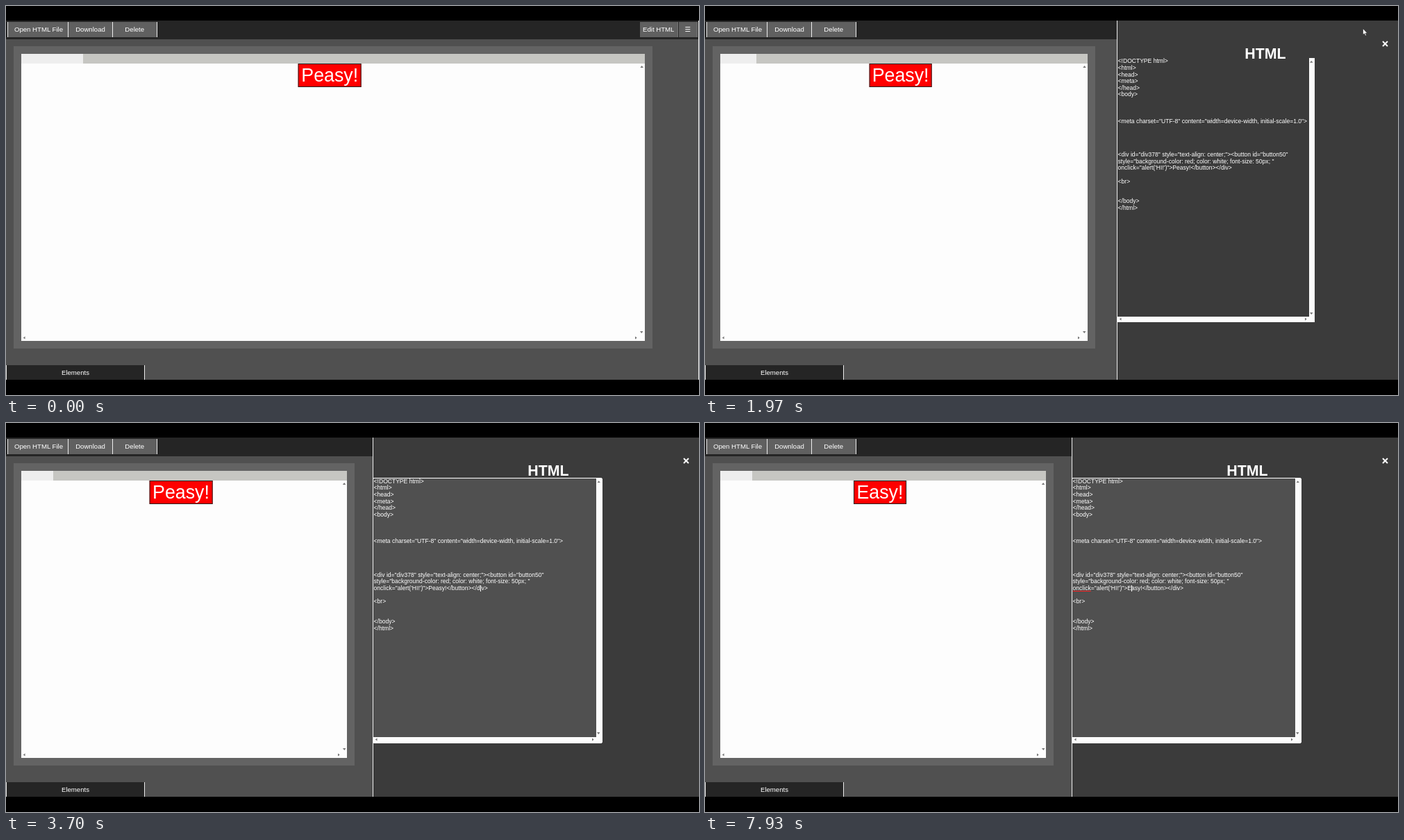
Animation, 998 px wide and 561 px high, one loop 8000 ms. Source, as an HTML page:

```html
<!DOCTYPE html>
<html lang="en">
<head>
<meta charset="utf-8">
<title>HTML editor</title>
<style>
html, body { margin: 0; width: 100%; height: 100%; overflow: hidden; background: #000; }
#stage { position: relative; width: 998px; height: 561px; overflow: hidden;
  font: 9.62px/22px "Liberation Sans", Arial, sans-serif; color: #fff; }
#stage div, #stage svg { position: absolute; box-sizing: border-box; }
#page { left: 0; top: 21px; width: 998px; height: 518px; background: #505050; overflow: hidden; }
#header { left: 0; top: 0; width: 998px; height: 26.5px; background: #252525; }
.btn { top: 2px; height: 22px; background: #606060; text-align: center; border-right: 1px solid #eee; white-space: nowrap; }
.plain { border-color: #777; }
#elements { left: 0; top: 496.5px; width: 200px; height: 21.5px; background: #252525;
  border: solid #eee; border-width: 0 1px; text-align: center; }
#frame { left: 11px; top: 37px; height: 436px; background: #636363; }
#view { left: 10.5px; right: 11px; top: 11px; height: 414px; background: #fdfdfd; }
#strip { left: 0; top: 0; width: 100%; height: 13.5px; background: #c6c6c2; }
#tab { left: 0; top: 0; width: 10%; height: 100%; background: #eee; }
#doc { left: 0; right: 9px; top: 13.5px; height: 34.5px; }
#demo { left: 50%; top: 0; height: 34.5px; padding: 0 3.5px; transform: translateX(-50%);
  background: #f00; border: 1.2px solid #222; font-size: 26.74px; line-height: 33px; white-space: nowrap; }
#panel { top: 0; right: 0; height: 518px; background: #3b3b3b; border-left: 1px solid #eee; overflow: hidden; }
#title { top: 36px; transform: translateX(-50%); font-weight: bold; font-size: 21.39px; line-height: 24px; }
#close { right: 14.5px; top: 29px; }
#editor { left: 0; height: 381px; }
#code { inset: 0 8px 8px 0; padding: 0 .3px 0 .6px; overflow: hidden; font-size: 8.555px; line-height: 9.62px;
  white-space: pre-wrap; overflow-wrap: break-word; }
#code .bad { text-decoration: underline 1px #f22; text-underline-offset: 1px; text-decoration-skip-ink: none; }
#vbar { right: 0; top: 0; width: 8px; height: 100%; background: #fcfcfc; }
#hbar { left: 0; bottom: 0; width: 100%; height: 8px; background: #fcfcfc; }
#ring { inset: -1px; border: 1px solid #fff; border-radius: 2px; }
#caret { top: 154.4px; width: 1px; height: 9px; background: #fff; }
#stage .tri { width: 4.6px; height: 3px; background: #777; clip-path: polygon(50% 0, 100% 100%, 0 100%); }
.up { right: 2px; top: 3.5px; }
.down { right: 2px; bottom: 11.5px; transform: rotate(180deg); }
.left { left: 2.4px; bottom: 3px; transform: rotate(-90deg); }
.right { right: 10.2px; bottom: 3px; transform: rotate(90deg); }
#view .up { top: 17px; }
</style>
</head>
<body>
<div id="stage">
  <div id="page">
    <div id="header">
      <div class="btn" style="left:2px;width:88px;border-left:1px solid #eee;padding-left:2px">Open HTML File</div>
      <div class="btn" style="left:90px;width:64px">Download</div>
      <div class="btn" style="left:154px;width:63.5px">Delete</div>
      <div class="btn plain" style="left:913px;width:54.5px">Edit HTML</div>
      <div class="btn plain" style="left:968.5px;width:27.5px">☰</div>
    </div>
    <div id="frame"><div id="view" class="scroll">
      <div id="strip"><div id="tab"></div></div>
      <div id="doc"><div id="demo"></div></div>
    </div></div>
    <div id="elements">Elements</div>
    <div id="panel">
      <div id="editor" class="scroll">
        <div id="vbar"></div><div id="hbar"></div>
        <div id="code"></div>
        <div id="caret"></div>
        <div id="ring"></div>
      </div>
      <div id="title">HTML</div>
      <svg id="close" width="9" height="9"><path d="M1 1 8 8M8 1 1 8" stroke="#fff" stroke-width="2"/></svg>
    </div>
  </div>
  <svg id="mouse" width="9" height="13"><path d="M.5 .5V9.6L2.6 7.7 4 11 5.5 10.3 4.1 7.2H6.8Z" fill="#fff" stroke="#222" stroke-width=".6"/></svg>
</div>
<script>
const LOOP = 8000, OPEN = 1660, OPEN_TIME = 548, PANEL = 470;
const HOVER = 2500, FOCUS = 3700, SPELL = 4030, CLICK = 6530;
// Edits to the button label: time, label, caret x in the editor
const edits = [[0, 'Peasy!', 153.5], [CLICK, 'Peasy!', 89.5], [6900, 'Pasy!', 84.5], [7130, 'asy!', 79], [7400, 'Easy!', 84.5]];

const $ = id => document.getElementById(id);
const clamp = v => Math.min(1, Math.max(0, v));
const mix = (a, b, k) => a + (b - a) * k;
const smooth = k => k * k * (3 - 2 * k);

for (const box of document.querySelectorAll('.scroll'))
  for (const side of ['up', 'down', 'left', 'right'])
    box.insertAdjacentHTML('beforeend', `<div class="tri ${side}"></div>`);

// CSS "ease", cubic-bezier(.25, .1, .25, 1)
function ease(x) {
  let lo = 0, hi = 1;
  for (let i = 0; i < 24; i++) {
    const s = (lo + hi) / 2;
    if (.75 * s * (1 - s) + s ** 3 < x) lo = s; else hi = s;
  }
  return .3 * lo * (1 - lo) ** 2 + 3 * (1 - lo) * lo * lo + lo ** 3;
}

const escape = s => s.replace(/</g, '&lt;');
const word = (s, bad) => bad ? `<span class="bad">${s}</span>` : s;
function source(label, t) {
  const spell = t >= SPELL;
  return escape('<!DOCTYPE html>\n<html>\n<head>\n<meta>\n</head>\n<body>\n\n\n\n' +
    '<meta charset="UTF-8" content="width=device-width, initial-scale=1.0">\n\n\n\n\n' +
    '<div id="div378" style="text-align: center;"><button id="button50" ' +
    'style="background-color: red; color: white; font-size: 50px; " ') +
    word('onclick', spell) + `="alert('HI!')">` +
    word(label.slice(0, -1), spell && t < CLICK) + '!' +
    escape('</button></div>\n\n<br>\n\n\n</body>\n</html>');
}

let shown = '';
function draw(t) {
  const w = Math.max(1, PANEL * ease(clamp((t - OPEN) / OPEN_TIME)));
  $('frame').style.width = .9137 * (998 - w) + 9 + 'px';
  $('panel').style.width = w + 'px';
  $('title').style.left = .6 * w - 30 + 'px';
  const editor = $('editor').style;
  editor.width = .7 * w + 'px';
  editor.top = 26.6 + .0685 * w + 'px';
  editor.background = `rgba(80,80,80,${clamp((t - HOVER) / 150)})`;

  const [start, label, x] = edits.findLast(e => t >= e[0]);
  const html = source(label, t);
  if (html !== shown) $('code').innerHTML = shown = html;
  $('demo').textContent = label;

  const focused = t >= FOCUS;
  const blinkOn = Math.floor((t - Math.max(start, FOCUS)) / 510) % 2 === 0;
  $('ring').hidden = !focused;
  $('caret').style.left = x + 'px';
  $('caret').hidden = !focused || !(blinkOn || t >= 7900);

  const move = smooth(clamp((t - 2240) / 300));
  const mouse = $('mouse').style;
  mouse.display = t >= 985 && t < 2530 ? '' : 'none';
  mouse.left = mix(946.5, 850, move) + 'px';
  mouse.top = mix(32, 170, move) + 'px';
}

function tick() {
  draw(performance.now() % LOOP);
  requestAnimationFrame(tick);
}
tick();
</script>
</body>
</html>
```
